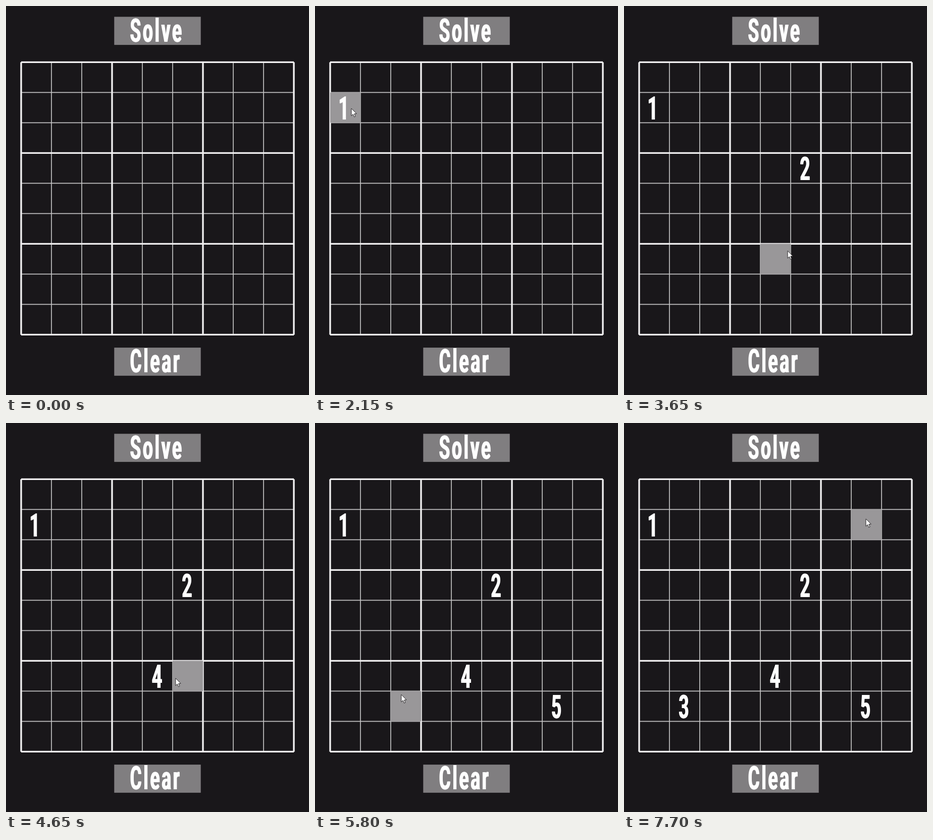
Recreate the animation shown at these times as an HTML page with a canvas. Size 600x771 px, loop 8 s.

```html
<!DOCTYPE html>
<html lang="en">
<head>
<meta charset="utf-8">
<title>Sudoku grid</title>
<style>
  html, body { margin: 0; width: 100%; height: 100%; overflow: hidden; background: #19171a; }
  canvas { display: block; }
</style>
</head>
<body>
<canvas id="stage" width="600" height="771"></canvas>
<script>
const ctx = document.getElementById('stage').getContext('2d');
const LOOP = 8000, STEP = 50;
const LEFT = 30, TOP = 111.4, CELL = 60;
const CURSOR_SHOWN = 1900;
const ENTRY = { x: 540, y: 330 };

// Each stop: eased trip from the previous one, then a digit typed in the cell below the pointer
const stops = [
  { go: 400, arrive: 750, x: 72, y: 203, digit: '1', typed: 2150 },
  { go: 2500, arrive: 2750, x: 350, y: 302, digit: '2', typed: 3000 },
  { go: 3400, arrive: 3700, x: 322, y: 500, digit: '4', typed: 4150 },
  { go: 4550, arrive: 5150, x: 509, y: 579, digit: '5', typed: 5300 },
  { go: 5300, arrive: 5950, x: 118, y: 550, digit: '3', typed: 6750, lift: 92 },
  { go: 7040, arrive: 7700, x: 479, y: 190 }
];

const smooth = u => u * u * (3 - 2 * u);
const cellStart = (v, origin) => origin + Math.floor((v - origin) / CELL) * CELL;

function pointerAt(t) {
  const i = stops.findLastIndex(s => t > s.go);
  if (i < 0) return null;
  const to = stops[i], from = stops[i - 1] || ENTRY;
  const k = smooth(Math.min(1, (t - to.go) / (to.arrive - to.go)));
  const arc = (to.lift || 0) * Math.sin(Math.PI * k) ** 2;
  return {
    x: from.x + (to.x - from.x) * k,
    y: from.y + (to.y - from.y) * k - arc
  };
}

// One condensed, heavy face for all text, aligned to the left edge of its ink
function label(text, x, baseline) {
  const spread = 2.6;
  ctx.save();
  ctx.translate(x, baseline);
  ctx.scale(0.54, 1);
  ctx.font = 'bold 65px Roboto, "Liberation Sans", sans-serif';
  ctx.letterSpacing = '7px';
  ctx.fillStyle = '#fff';
  const start = ctx.measureText(text).actualBoundingBoxLeft;
  ctx.fillText(text, start, 0);
  ctx.fillText(text, start + spread, 0);
  ctx.restore();
}

function button(text, y) {
  ctx.fillStyle = '#807e80';
  ctx.fillRect(214.3, y, 171.4, 55.7);
  label(text, 246, y + 49.3);
}

function gridLines(every, color, width) {
  const size = CELL * 9;
  ctx.strokeStyle = color;
  ctx.lineWidth = width;
  ctx.beginPath();
  for (let d = 0; d <= size; d += every * CELL) {
    ctx.moveTo(LEFT + d, TOP);
    ctx.lineTo(LEFT + d, TOP + size);
    ctx.moveTo(LEFT, TOP + d);
    ctx.lineTo(LEFT + size, TOP + d);
  }
  ctx.stroke();
}

function highlight({ x, y }) {
  ctx.fillStyle = '#999799';
  ctx.fillRect(cellStart(x, LEFT), cellStart(y, TOP), CELL, CELL);
}

function cursor({ x, y }) {
  ctx.save();
  ctx.translate(x, y);
  ctx.fillStyle = '#fff';
  ctx.strokeStyle = '#171517';
  ctx.lineWidth = 0.9;
  ctx.lineJoin = 'round';
  const arrow = new Path2D('M0 0V14.6L3.4 11.5L5.7 16.8L8 15.8L5.8 10.7L10.2 10.4Z');
  ctx.fill(arrow);
  ctx.stroke(arrow);
  ctx.restore();
}

function draw(t) {
  ctx.fillStyle = '#19171a';
  ctx.fillRect(0, 0, 600, 771);
  button('Solve', 21.4);
  button('Clear', 677.1);
  gridLines(1, '#c4c3c4', 1.7);
  gridLines(3, '#f0eff0', 3.4);

  const pointer = pointerAt(t);
  if (pointer) highlight(pointer);
  for (const s of stops) {
    if (t >= s.typed) label(s.digit, cellStart(s.x, LEFT) + 18.8, cellStart(s.y, TOP) + 53.4);
  }
  if (t >= CURSOR_SHOWN) cursor(pointer);
}

function tick(now) {
  const t = now % LOOP;
  draw(Math.floor(t / STEP) * STEP);
  requestAnimationFrame(tick);
}
requestAnimationFrame(tick);
</script>
</body>
</html>
```
